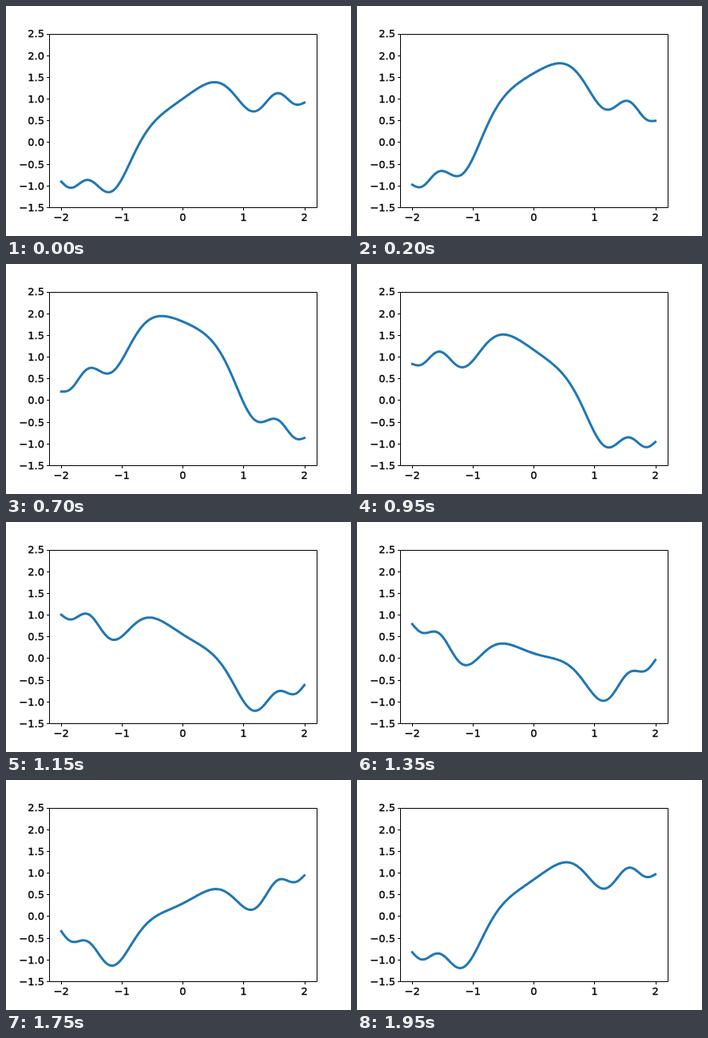
Animation, 432 px wide and 288 px high, one loop 2000 ms. Source, as an HTML page:

```html
<!DOCTYPE html>
<html lang="en">
<head>
<meta charset="utf-8">
<title>Travelling sine with a chirped sinc</title>
<style>
  html, body { margin: 0; width: 100%; height: 100%; overflow: hidden; background: #fff; }
  svg { display: block; }
  .axes { fill: none; stroke: #000; stroke-width: 1; }
  .curve { fill: none; stroke: #1f77b4; stroke-width: 3; stroke-linecap: square; stroke-linejoin: round; }
  text { font: 13px "DejaVu Sans", sans-serif; stroke: #000; stroke-width: .3px; }
  .x { text-anchor: middle; }
  .y { text-anchor: end; }
</style>
</head>
<body>
<svg width="432" height="288" viewBox="0 0 432 288">
  <path class="curve"/>
  <path class="axes"/>
  <g class="labels"></g>
</svg>
<script>
  const LOOP = 2000, STEP = 50, SAMPLES = 400;
  const LEFT = 54, RIGHT = 388.8, TOP = 34.56, BOTTOM = 252;
  const px = x => LEFT + (x + 2.2) / 4.4 * (RIGHT - LEFT);
  const py = y => BOTTOM - (y + 1.5) / 4 * (BOTTOM - TOP);
  const snap = v => Math.round(v) + 0.5;
  const find = s => document.querySelector(s);
  const curve = find('.curve'), labels = find('.labels');

  function addLabel(text, x, y, cls) {
    const el = document.createElementNS('http://www.w3.org/2000/svg', 'text');
    el.setAttribute('x', x);
    el.setAttribute('y', y);
    el.setAttribute('class', cls);
    el.textContent = text.replace('-', '\u2212');
    labels.append(el);
  }

  function drawAxes() {
    let d = `M${snap(LEFT)} ${snap(TOP)}H${snap(RIGHT)}V${snap(BOTTOM)}H${snap(LEFT)}Z`;
    for (let x = -2; x <= 2; x++) {
      d += `M${snap(px(x))} ${snap(BOTTOM)}v3.5`;
      addLabel(String(x), px(x), 269, 'x');
    }
    for (let y = -1.5; y <= 2.5; y += 0.5) {
      d += `M${snap(LEFT)} ${snap(py(y))}h-3.5`;
      addLabel(y.toFixed(1), 48, py(y) + 4.9, 'y');
    }
    find('.axes').setAttribute('d', d);
  }

  const sinc = u => u ? Math.sin(Math.PI * u) / (Math.PI * u) : 1;

  function drawCurve(phase) {
    const points = [];
    for (let i = 0; i <= SAMPLES; i++) {
      const x = -2 + 4 * i / SAMPLES;
      const y = Math.sin(x + phase) + sinc(x * x);
      points.push(px(x).toFixed(2) + ' ' + py(y).toFixed(2));
    }
    curve.setAttribute('d', 'M' + points.join('L'));
  }

  function tick() {
    const t = Math.floor(performance.now() % LOOP / STEP) * STEP;
    drawCurve(2 * Math.PI * t / LOOP);
    requestAnimationFrame(tick);
  }

  drawAxes();
  tick();
</script>
</body>
</html>
```
